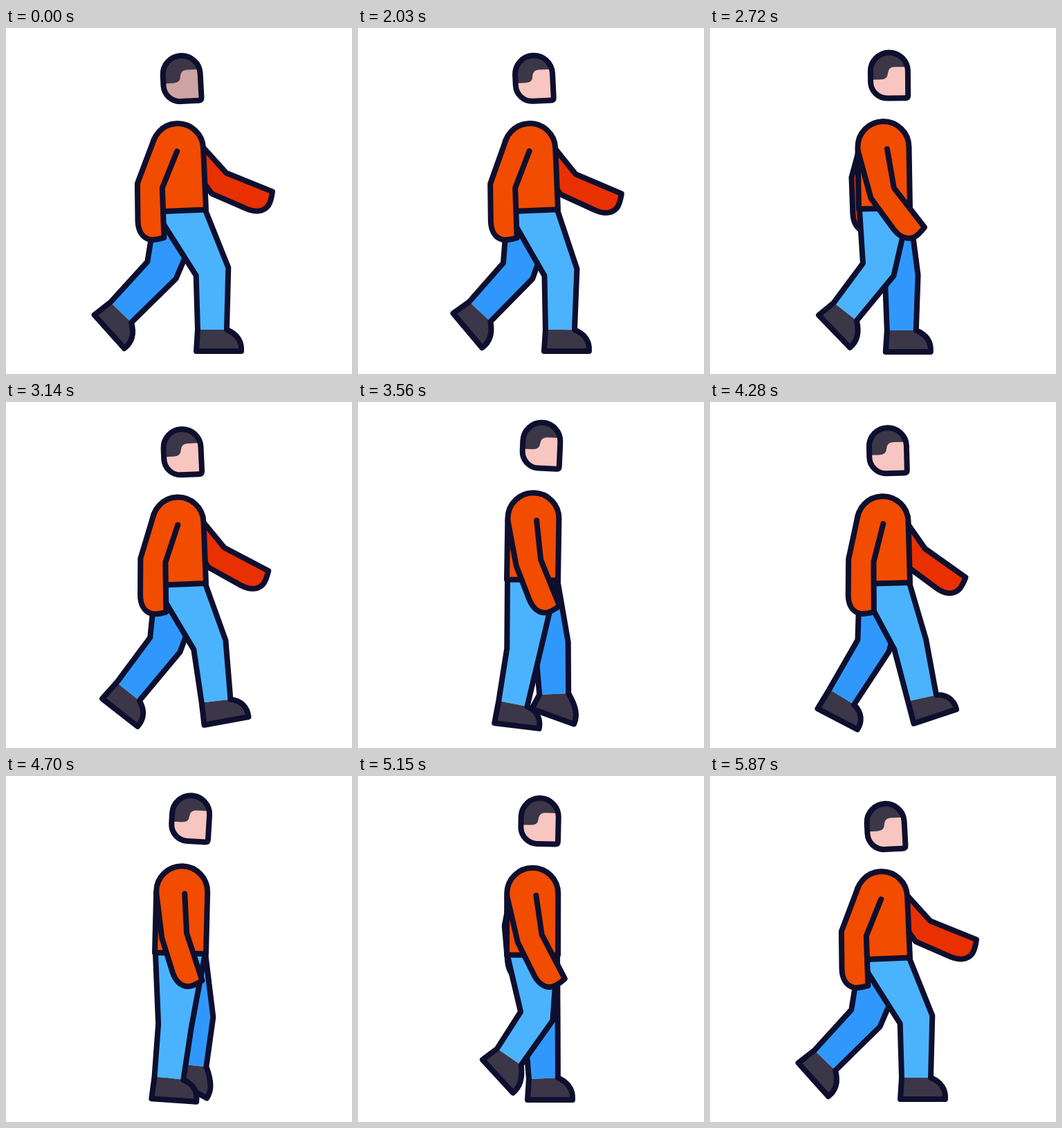
These frames come from a looping animation (500x500 px, 5.9 s). An HTML page with a canvas:

```html
<!DOCTYPE html>
<html lang="en">
<head>
<meta charset="utf-8">
<title>Walking man</title>
<style>
  html, body { margin: 0; height: 100%; overflow: hidden; background: #fff; }
  canvas { display: block; width: 500px; height: 500px; }
</style>
</head>
<body>
<canvas id="stage" width="500" height="500"></canvas>
<script>
const ctx = document.getElementById('stage').getContext('2d');
const LOOP = 5900, HOLD = 2030, STEP = 30, STEPS = 129, CYCLE = 40;
const INK = '#0e0f2e', DARK = '#3b3648', SHIRT = '#f24c00', SLEEVE = '#e93000';
const NEAR_JEANS = '#4bb3fe', FAR_JEANS = '#3098fd', SKIN = '#f8c6c1', RESTING_SKIN = '#cda4a3';

// phase, knee x, knee y, ankle x, ankle y, foot angle
const LEG = [
  [0, 298, 352, 298, 436, 0], [1, 293, 353, 292, 436, 0],
  [4.2, 277, 360, 277, 437, 0], [6.2, 264, 360, 267, 437, 0],
  [12.5, 239, 360, 224, 436, 7], [16.3, 237, 353, 194, 428, 25],
  [20, 225, 350, 166, 411, 48], [21, 231, 351, 176, 410, 50],
  [24.2, 243, 349, 195, 410, 46], [26.2, 259, 347, 220, 406, 47],
  [32.5, 280, 351, 283, 422, 20], [36.3, 288, 350, 306, 427, -18]
];
// phase, upper arm angle, forearm angle (from straight down, forward positive)
const NEAR_ARM = [
  [0, -22, 2], [1, -21, 2], [12.5, 6, 22], [20, 14, 52],
  [24.2, 10, 38], [26.2, 8, 27], [36.3, -13, 1]
];
const FAR_ARM = [
  [0, -18, 2], [4.2, -14, 3], [12.5, 8, 22], [16.3, 33, 52], [20, 42, 68],
  [21, 39, 67], [26.2, 10, 30], [32.5, -2, 10], [36.3, -12, 3]
];

const rad = deg => deg * Math.PI / 180;
const add = (p, x, y) => [p[0] + x, p[1] + y];

// Smooth periodic interpolation through a key table
function sample(keys, phase) {
  phase = (phase % CYCLE + CYCLE) % CYCLE;
  const n = keys.length;
  const key = j => {
    const [time, ...values] = keys[(j + n) % n];
    return { time: time + Math.floor(j / n) * CYCLE, values };
  };
  let i = n - 1;
  while (keys[i][0] > phase) i--;
  const [a, b, c, d] = [i - 1, i, i + 1, i + 2].map(key);
  const span = c.time - b.time, u = (phase - b.time) / span;
  return b.values.map((from, k) => {
    const to = c.values[k];
    const m0 = (to - a.values[k]) / (c.time - a.time) * span;
    const m1 = (d.values[k] - from) / (d.time - b.time) * span;
    return from + u * (m0 + u * (3 * (to - from) - 2 * m0 - m1 + u * (2 * (from - to) + m0 + m1)));
  });
}

function paint(path, fill, stroke = true) {
  if (fill) { ctx.fillStyle = fill; ctx.fill(path); }
  if (stroke) ctx.stroke(path);
}

// Six numbers per curve, two per line
function trace(start, ...parts) {
  const path = new Path2D();
  path.moveTo(...start);
  for (const p of parts) p.length > 2 ? path.bezierCurveTo(...p) : path.lineTo(...p);
  return path;
}

function drawLeg(waist, phase, jeans) {
  const [kx, ky, ax, ay, turn] = sample(LEG, phase);
  const thigh = Math.atan2(kx - waist[0], ky - waist[1]);
  const shin = Math.atan2(ax - kx, ay - ky), bend = (thigh + shin) / 2;
  const side = (x, y, angle, w) => [x + w * Math.cos(angle), y - w * Math.sin(angle)];
  const sin = Math.sin(rad(turn)), cos = Math.cos(rad(turn));
  const foot = (x, y) => [ax + x * cos - y * sin, ay + x * sin + y * cos];

  const hipBack = add(waist, -36, 1), hipFront = add(waist, 36, -1);
  const kneeBack = side(kx, ky, bend, -24), kneeFront = side(kx, ky, bend, 24);
  const ankleBack = side(ax, ay, shin, -21), ankleFront = side(ax, ay, shin, 21);
  const shoe = [foot(-23, 31), foot(42, 31),
    [...foot(43, 17), ...foot(36, 6), ...ankleFront]];

  paint(trace(hipBack, kneeBack, ankleBack, ankleFront, kneeFront, hipFront), jeans, false);
  paint(trace(ankleBack, ...shoe), DARK, false);
  paint(trace(hipBack, kneeBack, ankleBack, ...shoe, kneeFront, hipFront));
}

function drawArm(start, outer, upper, lower, fill) {
  const a = rad(upper), b = rad(lower), mid = (a + b) / 2;
  const elbow = add(start, 57 * Math.sin(a), 57 * Math.cos(a));
  const elbowBack = add(elbow, -36.5 * Math.cos(mid), 36.5 * Math.sin(mid));
  const tip = add(elbow, 72 * Math.sin(b), 72 * Math.cos(b));
  const hand = (back, along) => add(tip,
    -back * Math.cos(b) + along * Math.sin(b), back * Math.sin(b) + along * Math.cos(b));
  paint(trace(start, elbow, tip,
    [...hand(12, 3), ...hand(17, 3), ...hand(21, 2)],
    [...hand(32, -1), ...hand(37, -12), ...hand(37, -25)],
    elbowBack, outer), fill);
}

function drawTorso(waist, tilt) {
  ctx.save();
  ctx.translate(...waist);
  ctx.rotate(tilt);
  const body = new Path2D('M-37 0V-89A37 37 0 0 1 37 -89V0Z');
  paint(body, SHIRT);
  ctx.restore();
}

function drawHead(bob, skin) {
  ctx.save();
  ctx.translate(254 + 13 * bob, 73 - 12 * bob);
  ctx.rotate(rad(-3 + 6.5 * bob));
  const face = new Path2D('M-27 -6A27 27 0 0 1 27 -6V29Q27 33 23 33H-3A24 24 0 0 1 -27 9Z');
  paint(face, skin, false);
  paint(new Path2D('M-27 6H-13Q-2 6 -2 -3Q-1 -12 8 -12H27V-6A27 27 0 0 0 -27 -6Z'), DARK, false);
  paint(face);
  ctx.restore();
}

// Steady walk that slows to a stop at the end
function phaseAt(step) {
  if (step < 105) return 1.01 * step;
  return 3 * CYCLE - 13.95 * (1 - (step - 105) / (STEPS - 105)) ** 1.74;
}

function draw(t) {
  const resting = t < HOLD;
  const phase = resting ? 0 : phaseAt(Math.min(STEPS, Math.floor((t - HOLD) / STEP) + 1));
  const bob = Math.sin(Math.PI * phase / 20) ** 2;
  const waist = [252, 264 - 8 * bob], tilt = rad(-2.5 + 4 * bob);
  const shoulder = add(waist, 89 * Math.sin(tilt), -89 * Math.cos(tilt));

  ctx.fillStyle = '#fff';
  ctx.fillRect(0, 0, 500, 500);
  ctx.lineWidth = 8;
  ctx.lineCap = ctx.lineJoin = 'round';
  ctx.strokeStyle = INK;

  const [farUpper, farLower] = sample(FAR_ARM, phase + 20);
  const farStart = add(shoulder, 11 + farUpper / 2, -8);
  drawArm(farStart, add(farStart, -36, 0), farUpper, farLower, SLEEVE);
  drawLeg(waist, phase + 20, FAR_JEANS);
  drawLeg(waist, phase, NEAR_JEANS);
  drawTorso(waist, tilt);

  const [upper, lower] = sample(NEAR_ARM, phase);
  const a = rad(upper);
  drawArm(add(shoulder, 3.5 + upper / 5, 3),
    add(shoulder, -37 * Math.cos(a), 37 * Math.sin(a)), upper, lower, SHIRT);
  drawHead(bob, resting ? RESTING_SKIN : SKIN);
}

const begin = performance.now();
function tick() {
  draw((performance.now() - begin) % LOOP);
  requestAnimationFrame(tick);
}
tick();
</script>
</body>
</html>
```
